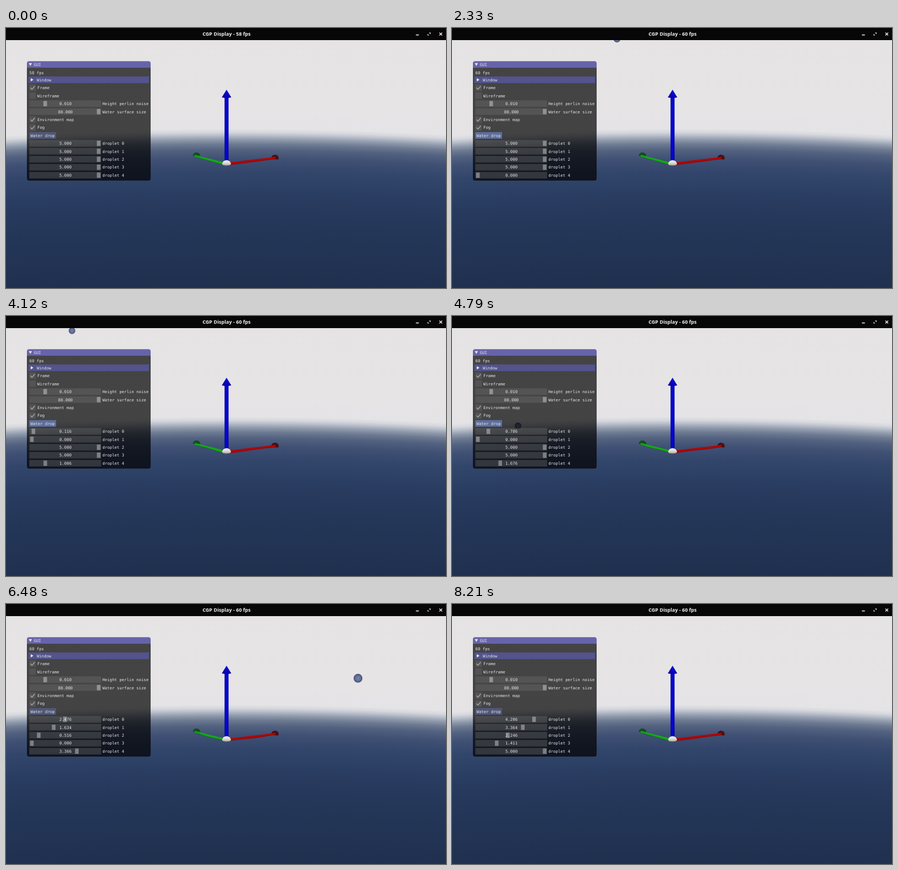
These frames come from a looping animation (800x472 px, 8.27 s). An HTML page with a canvas:

```html
<!DOCTYPE html>
<html lang="en">
<head>
<meta charset="utf-8">
<title>CGP Display</title>
<style>
html, body { margin: 0; width: 800px; height: 472px; overflow: hidden; background: #070707; }
canvas { display: block; }
</style>
</head>
<body>
<canvas id="stage" width="800" height="472"></canvas>
<script>
const LOOP = 8270, FALL = 1010;
const stage = document.getElementById('stage');
const g = stage.getContext('2d');
const MONO = '7.35px "DejaVu Sans Mono", monospace';
const TEXT = '#e6e6e6', FRAME = 'rgba(110,110,110,.39)';

// Landing time, screen position of the landing point, fall height, radius
const drops = [
  { land: 4005, x: 520.5, y: 222, h: 212, r: 6 },
  { land: 4847, x: 120, y: 222, h: 212, r: 6 },
  { land: 5965, x: 200, y: 225, h: 215, r: 6 },
  { land: 6800, x: 640, y: 288, h: 288, r: 8 },
  { land: 3115, x: 300, y: 215, h: 205, r: 6 }
];

function box(x, y, w, h, color, radius = 0) {
  g.fillStyle = color;
  g.beginPath();
  g.roundRect(x, y, w, h, radius);
  g.fill();
}

function poly(color, ...p) {
  g.fillStyle = color;
  g.beginPath();
  for (let i = 0; i < p.length; i += 2) g.lineTo(p[i], p[i + 1]);
  g.closePath();
  g.fill();
}

function line(color, width, ...p) {
  g.strokeStyle = color;
  g.lineWidth = width;
  g.beginPath();
  for (let i = 0; i < p.length; i += 2) g.lineTo(p[i], p[i + 1]);
  g.stroke();
}

function label(str, x, y, align = 'left', font = MONO, color = TEXT) {
  g.font = font;
  g.textAlign = align;
  g.textBaseline = 'alphabetic';
  g.fillStyle = color;
  g.fillText(str, x, y + 2.7);
}

function blend(x0, y0, x1, y1, ...stops) {
  const grad = g.createLinearGradient(x0, y0, x1, y1);
  for (let i = 0; i < stops.length; i += 2) grad.addColorStop(stops[i], stops[i + 1]);
  return grad;
}

// Sky and fogged water, with a horizon that dips towards both sides
function makeScene() {
  const scene = document.createElement('canvas');
  scene.width = 800;
  scene.height = 472;
  const c = scene.getContext('2d');
  const grad = c.createLinearGradient(0, 0, 0, 472);
  const stops = [
    [0, '#e5e3e4'], [150, '#e6e4e5'], [183, '#e4e3e6'], [189, '#d6d8dd'],
    [195, '#b9bfca'], [202, '#939dae'], [211, '#6d7a92'], [222, '#52617f'],
    [238, '#3f5074'], [262, '#32456a'], [300, '#2a3d62'], [360, '#243759'],
    [472, '#202f4e']
  ];
  for (const [y, color] of stops) grad.addColorStop(y / 472, color);
  c.fillStyle = grad;
  for (let x = 0; x < 800; x++) {
    const dip = 12 * ((x - 415) / 400) ** 2;
    c.setTransform(1, 0, 0, 1, x, dip);
    c.fillRect(0, -dip, 1, 472);
  }
  return scene;
}
const scene = makeScene();

// Small swell along the half-submerged axes after each landing
function swell(t, u) {
  let s = 0;
  for (const d of drops) {
    const age = (t - d.land) / 1000;
    if (age > 0) s += .7 * Math.min(1, age * 3) * Math.exp(-age * .9) * Math.sin(7 * u - 5 * age);
  }
  return s;
}

function floatingRod(t, x0, y0, x1, y1, w0, w1, color, shade) {
  const top = [], low = [];
  for (let i = 0; i <= 16; i++) {
    const u = i / 16, x = x0 + (x1 - x0) * u, y = y0 + (y1 - y0) * u;
    const w = w0 + (w1 - w0) * u, s = swell(t, u);
    top.push(x, y - w / 2 + Math.max(0, s) * .3);
    low.unshift(x, y + w / 2 + Math.min(.6, s));
  }
  poly(color, ...top, ...low);
  line(shade, .8, ...low);
}

function cap(x, y, rx, ry, tilt, color) {
  g.fillStyle = color;
  g.beginPath();
  g.ellipse(x, y, rx, ry, tilt, Math.PI * .95, Math.PI * 2.2);
  g.fill();
}

function axes(t) {
  cap(346.5, 232, 6.8, 6, .2, '#12501a');
  floatingRod(t, 396, 246, 343, 232, 4.6, 3.4, '#14a818', '#0c7412');
  cap(489, 236, 6.8, 6, -.12, '#481014');
  floatingRod(t, 408, 246, 490, 235.8, 4.6, 3.6, '#b00608', '#78080c');

  box(397.4, 125, 7.2, 120, blend(397, 0, 405, 0, 0, '#0000a0', .4, '#0808dc', 1, '#0000a4'));
  poly(blend(392, 0, 410, 0, 0, '#00008c', .5, '#0808cc', 1, '#000090'), 401, 112, 409.6, 126, 392.4, 126);
  g.fillStyle = '#00007c';
  g.beginPath();
  g.ellipse(401, 125.6, 8.4, 1.2, 0, 0, Math.PI);
  g.fill();

  g.fillStyle = blend(0, 240, 0, 250, 0, '#f2f0ee', .6, '#d8d5d2', 1, '#9b9995');
  g.beginPath();
  g.ellipse(401, 247, 8, 7, 0, Math.PI, 0);
  g.ellipse(401, 247, 8, 2.8, 0, 0, Math.PI);
  g.fill();
}

function balls(t) {
  for (const d of drops) {
    const p = (t - d.land + FALL) / FALL;
    if (p < 0 || p >= 1) continue;
    const y = d.y - d.h * (1 - p * p);
    const grad = g.createRadialGradient(d.x, y, 0, d.x, y, d.r);
    grad.addColorStop(0, '#7583ae');
    grad.addColorStop(.6, '#606e9a');
    grad.addColorStop(1, '#454c64');
    g.fillStyle = grad;
    g.beginPath();
    g.arc(d.x, y, d.r, 0, 7);
    g.fill();
  }
}

function titleBar(fps) {
  box(0, 0, 800, 22, '#070707');
  label(`CGP Display - ${fps} fps`, 401, 11.2, 'center', '700 9.1px "Noto Sans", "Open Sans", sans-serif', '#f0f0f0');
  line('#eee', 1.6, 745.3, 12.6, 750.7, 12.6);
  line('#eee', 1.2, 767, 11, 767, 13, 769, 13);
  line('#eee', 1.2, 769.5, 8.8, 771.5, 8.8, 771.5, 10.8);
  line('#eee', 1.4, 788, 8.5, 793, 13.5);
  line('#eee', 1.4, 793, 8.5, 788, 13.5);
}

function check(name, y, on) {
  box(42.3, y - 6, 12, 12, FRAME);
  if (on) line('rgba(230,230,230,.55)', 1.5, 44.4, y, 47.2, y + 2.8, 52.4, y - 3);
  label(name, 57, y);
}

function slider(name, y, value, max) {
  const x = 47 + 121.5 * value / max;
  box(42.3, y - 6, 130.7, 12, FRAME);
  box(x - 3.3, y - 4.8, 6.6, 9.6, 'rgba(255,255,255,.36)');
  label(value.toFixed(3), 108, y, 'center');
  label(name, 175.2, y);
}

function dropButton(t) {
  const pressed = drops.some(d => t > d.land - FALL - 90 && t < d.land - FALL);
  const hovered = t > 500 && t < 6400;
  box(42.3, 189, 48.7, 12, pressed ? '#758acc' : hovered ? 'rgba(102,122,181,.79)' : 'rgba(89,102,156,.62)');
  label('Water drop', 44.5, 195);
}

function panel(t, fps) {
  box(38, 72, 225, 205, 'rgba(0,0,0,.7)', [0, 0, 4, 4]);
  box(38, 60.3, 225, 11.9, 'rgba(82,82,161,.87)', [4, 4, 0, 0]);
  poly(TEXT, 41.3, 63.8, 47.3, 63.8, 44.3, 68.8);
  label('GUI', 50.5, 66.3);
  label(`${fps} fps`, 42.5, 81.5);
  box(40.8, 88, 219.2, 12, 'rgba(102,102,230,.45)');
  poly(TEXT, 45, 91, 50, 94, 45, 97);
  label('Window', 56, 94);
  check('Frame', 108.4, true);
  check('Wireframe', 122.8, false);
  slider('Height perlin noise', 137.3, .01, .05);
  slider('Water surface size', 151.8, 80, 80);
  check('Environment map', 166.3, true);
  check('Fog', 180.7, true);
  dropButton(t);
  drops.forEach((d, i) => {
    const age = t - d.land;
    const value = age < -FALL ? 5 : Math.min(5, Math.max(0, age / 1000));
    slider('droplet ' + i, 209.4 + 14.45 * i, value, 5);
  });
}

function draw(now) {
  const t = now % LOOP;
  const fps = t < 130 ? 58 : t < 1130 ? 59 : t < 2130 ? 58 : 60;
  g.drawImage(scene, 0, 0);
  balls(t);
  axes(t);
  titleBar(fps);
  panel(t, fps);
}

const start = performance.now();
function tick() {
  draw(performance.now() - start);
  requestAnimationFrame(tick);
}
tick();
</script>
</body>
</html>
```
